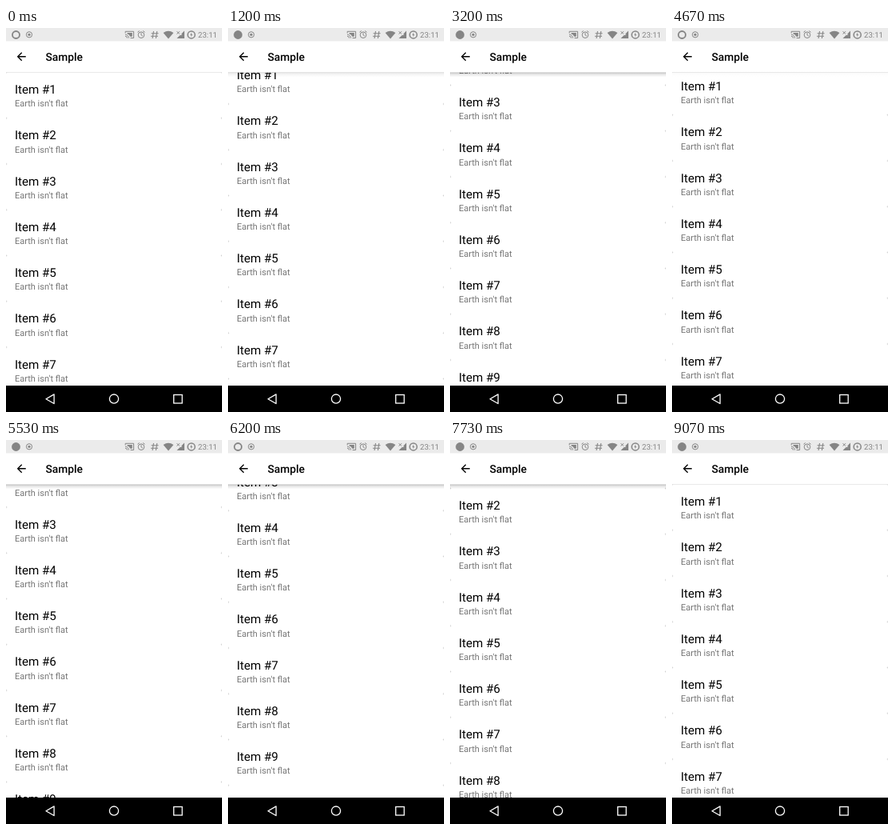
Recreate the animation shown at these times as an HTML page. Size 270 by 480 pixels, loop 9390 ms.

```html
<!DOCTYPE html>
<html lang="en">
<head>
<meta charset="utf-8">
<title>Sample</title>
<style>
html, body { margin: 0; width: 100%; height: 100%; overflow: hidden; background: #fff; }
svg { display: block; width: 100vw; height: 100vh; }
/* the tiny turn stops baselines snapping to whole pixels */
text { font-family: Roboto, sans-serif; text-rendering: geometricPrecision; transform: rotate(.02deg); }
.title { font-size: 15.125px; fill: #000; }
.sub { font-size: 11px; fill: #757575; }
.line { fill: none; stroke: #858585; }
.nav { fill: none; stroke: #fff; stroke-width: 1.3; }
</style>
</head>
<body>
<svg viewBox="0 0 270 480">
  <defs>
    <linearGradient id="fade" x1="0" y1="0" x2="0" y2="1">
      <stop offset="0" stop-color="#000" stop-opacity=".28"/>
      <stop offset=".45" stop-color="#000" stop-opacity=".09"/>
      <stop offset="1" stop-color="#000" stop-opacity="0"/>
    </linearGradient>
  </defs>

  <rect y="55" width="270" height="392" fill="#fff"/>
  <g id="list"></g>

  <rect id="shadow" y="55" width="270" height="6.5" fill="url(#fade)"/>
  <rect y="16" width="270" height="39" fill="#fff"/>
  <rect y="55" width="270" height=".8" fill="#e4e4e4"/>
  <path transform="translate(11 27.5) scale(.6875)" d="M20 11H7.83l5.59-5.59L12 4l-8 8 8 8 1.41-1.41L7.83 13H20z"/>
  <text x="49.5" y="41.15" font-size="13.75" font-weight="500">Sample</text>

  <rect width="270" height="16.5" fill="#ebebeb"/>
  <g fill="#858585">
    <circle class="line" cx="12.5" cy="8.5" r="4.5" stroke-width="1.8"/>
    <circle id="dot" cx="12.5" cy="8.5" r="4.6"/>
    <circle class="line" cx="29" cy="8.3" r="3.6"/>
    <circle cx="29" cy="8.3" r="1.6"/>
    <path class="line" d="M149.2 6.5V4.3h10.4v8.2h-4M149 8.2a4.4 4.4 0 0 1 4.4 4.4M149 10.2a2.4 2.4 0 0 1 2.4 2.4"/>
    <path d="M151.5 6h6.3v4.8h-2.5Q154.2 8 151.5 7.2z"/>
    <path class="line" d="M164.5 5.3l2.2-1.8M173.5 5.3l-2.2-1.8M169 6.2v2.6l1.8 1.1"/>
    <circle class="line" cx="169" cy="8.7" r="3.8"/>
    <path class="line" stroke-width="1.1" d="M184.5 4l-1.4 9M188.8 4l-1.4 9M181.6 6.8h9M181 10.2h9"/>
    <path d="M196.6 5.9Q203 1.6 209.4 5.9L203 13.4z"/>
    <path d="M223 3.5V13h-9.5L217.5 9h2V7z"/>
    <path class="line" d="M213.6 4.2l3.4 3.4M217 4.2l-3.4 3.4"/>
    <circle class="line" cx="231.7" cy="8.4" r="4.5" stroke-width="1.5"/>
    <path d="M232.3 5.6l-2.2 3.2h1.4l-.4 2.4 2.2-3.2h-1.4z"/>
    <text x="240" y="12" font-size="9.63">23:11</text>
  </g>

  <rect y="447" width="270" height="33" fill="#000"/>
  <path class="nav" stroke-linejoin="round" d="M50 463.7l10.1-5.8v11.6z"/>
  <circle class="nav" cx="135" cy="463.6" r="5.6"/>
  <rect class="nav" x="209.7" y="458.5" width="10.5" height="10.5"/>
</svg>
<script>
const LOOP = 9390, STEP = 1000 / 15, ROW = 57.25, TOP = 55.5;
const $ = id => document.getElementById(id);

// [time, scroll offset]
const keys = [
  [0, 0], [667, 0], [2067, 75.5], [2620, 104], [3200, 98.5], [4133, 0],
  [4600, 0], [4667, 4], [5533, 86], [6400, 144], [6867, 138.3], [8400, 0], [LOOP, 0]
];
// times at which the recording dot toggles
const blinks = [1060, 2060, 3060, 4060, 5000, 5930, 6860, 8000, 9060];

// rows are white cards whose rounded corners show at both edges
const notch = 'M0 -2Q0 0 2 0Q0 0 0 2zM270 -2Q270 0 268 0Q270 0 270 2z';
$('list').innerHTML = Array.from({ length: 12 }, (_, i) => `
  <g transform="translate(0 ${TOP + i * ROW})">
    <path d="${notch}" fill="#d0d0d0"/>
    <text class="title" x="11" y="26.6">Item #${i + 1}</text>
    <text class="sub" x="11" y="42.8">Earth isn't flat</text>
  </g>`).join('');

const rate = i => (keys[i + 1][1] - keys[i][1]) / (keys[i + 1][0] - keys[i][0]);
// monotone tangents: flat at turning points
const slopes = keys.map((_, i) => {
  if (i === 0 || i === keys.length - 1) return 0;
  const a = rate(i - 1), b = rate(i);
  return a * b > 0 ? 2 * a * b / (a + b) : 0;
});

function scrollAt(t) {
  let i = 0;
  while (i < keys.length - 2 && t >= keys[i + 1][0]) i++;
  const [t0, a] = keys[i], [t1, b] = keys[i + 1];
  const h = t1 - t0, u = (t - t0) / h, v = 1 - u;
  return v * v * ((1 + 2 * u) * a + u * h * slopes[i])
       + u * u * ((1 + 2 * v) * b - v * h * slopes[i + 1]);
}

function draw(t) {
  const y = scrollAt(Math.floor((t + 4) / STEP) * STEP);
  $('list').setAttribute('transform', `translate(0 ${-y.toFixed(2)})`);
  $('shadow').setAttribute('opacity', Math.min(1, y / 40));
  const on = blinks.filter(b => t >= b).length % 2;
  $('dot').setAttribute('visibility', on ? 'visible' : 'hidden');
}

const start = performance.now();
function tick() {
  draw((performance.now() - start) % LOOP);
  requestAnimationFrame(tick);
}
tick();
</script>
</body>
</html>
```
